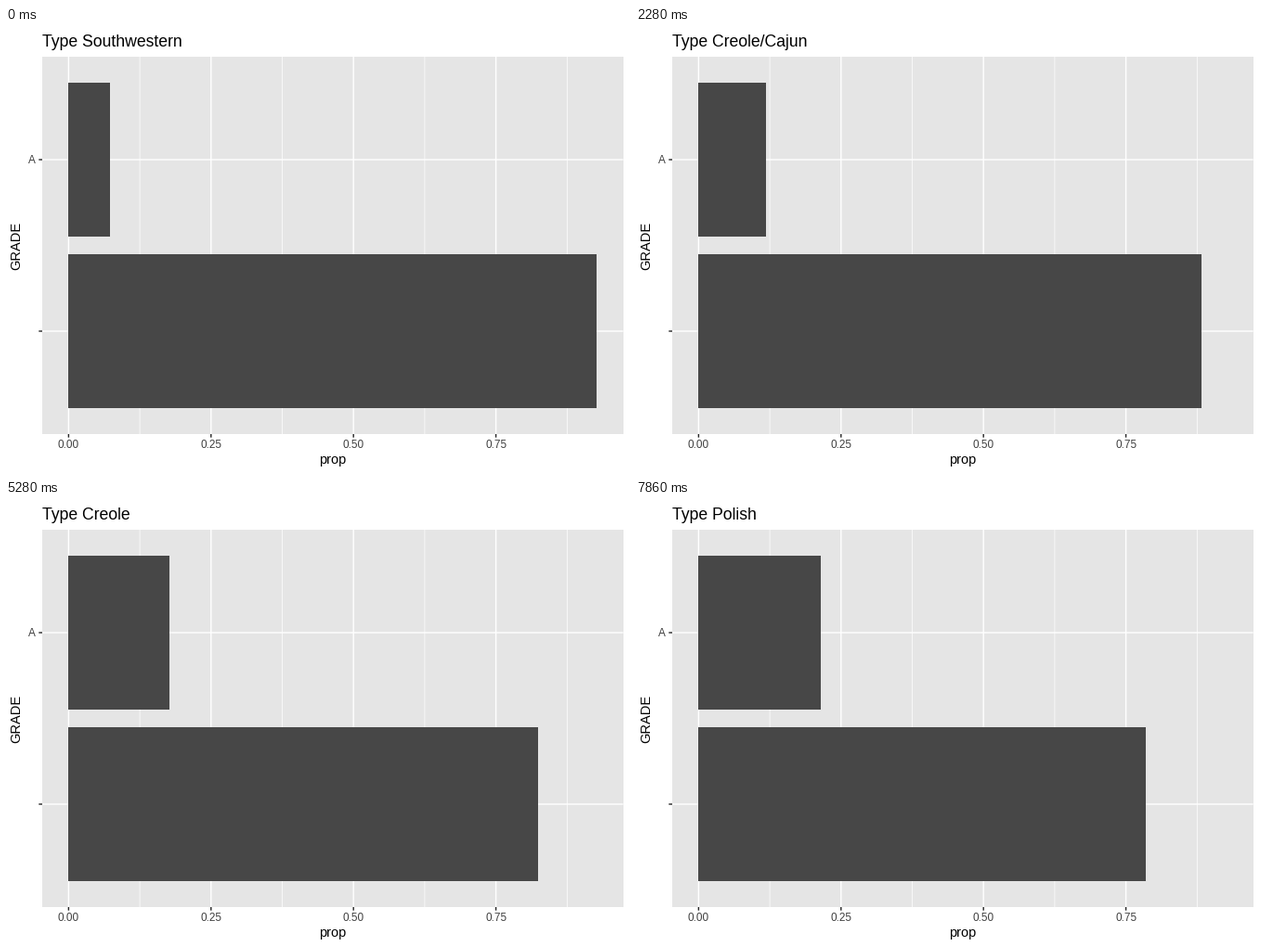
Animation, 672 px wide and 480 px high, one loop 8 s. Source, as a matplotlib script:

```python
import math

import matplotlib.pyplot as plt
from matplotlib.animation import FuncAnimation
from matplotlib.patches import Rectangle

W, H, DPI = 672, 480, 96
STEP, FRAMES = 20, 400
TICK = 30                       # the picture updates on a 30 ms grid
PERIOD, MOVE, FIRST = 540, 480, 285

LEFT, TOP, RIGHT, BOTTOM = 39, 31, 664.6, 438
ZERO, UNIT = 67.4, 613.6        # pixel of 0 and pixels per 1.0 on the x axis
ROW_A, ROW_B, BAR_H = 142, 327, 166
PANEL, BAR, INK, LABEL, MARK = "#e5e5e5", "#474747", "black", "#3e3e3e", "#262626"

# title and share of the lower bar, in order
STATES = [
    ("Southwestern", 38 / 41),
    ("Californian", 0.8998),
    ("Pakistani", 35 / 39),
    ("Filipino", 8 / 9),
    ("Creole/Cajun", 15 / 17),
    ("Chinese/Japanese", 17 / 20),
    ("Chilean", 16 / 19),
    ("African", 16 / 19),
    ("Soul Food", 0.8329),
    ("Korean", 24 / 29),
    ("Creole", 14 / 17),
    ("Spanish", 22 / 27),
    ("Vietnamese/Cambodian/Malaysia", 15 / 19),
    ("Caribbean", 0.787),
    ("Pancakes/Waffles", 0.7857),
    ("Polish", 0.785),
]

plt.rcParams["font.family"] = "Liberation Sans"
fig = plt.figure(figsize=(W / DPI, H / DPI), dpi=DPI, facecolor="white")
ax = fig.add_axes([0, 0, 1, 1])
ax.set_xlim(0, W)
ax.set_ylim(H, 0)
ax.axis("off")


def x_pos(value):
    return ZERO + UNIT * value


def line(x0, y0, x1, y1, color, width):
    ax.plot([x0, x1], [y0, y1], color=color, lw=width * 72 / DPI,
            solid_capstyle="butt", snap=False, zorder=2)


def label(x, y, text, size, color=INK, ha="center", **kw):
    kw.setdefault("va", "baseline")
    return ax.text(x, y, text, fontsize=size, color=color, ha=ha, **kw)


def bar(row):
    patch = Rectangle((67, row - BAR_H / 2), 1, BAR_H, fc=BAR, lw=0, zorder=3)
    return ax.add_patch(patch)


def ease(p):
    """Cubic in and out."""
    return 4 * p ** 3 if p < 0.5 else 1 - 4 * (1 - p) ** 3


def state_at(t):
    """Title and lower share at time t in ms."""
    k = min(max(math.floor((t - FIRST) / PERIOD + 0.5), 0), len(STATES) - 2)
    p = (t - FIRST - k * PERIOD) / MOVE + 0.5
    p = min(max(p, 0), 1)
    (name0, v0), (name1, v1) = STATES[k], STATES[k + 1]
    return (name0 if p < 0.5 else name1), v0 + (v1 - v0) * ease(p)


# panel, grid and axes
ax.add_patch(Rectangle((LEFT, TOP), RIGHT - LEFT, BOTTOM - TOP,
                       fc=PANEL, lw=0, zorder=1))
for i in range(4):
    minor, major = x_pos(0.125 + i / 4), x_pos(i / 4)
    line(minor, TOP, minor, BOTTOM, "white", 0.71)
    line(major, TOP, major, BOTTOM, "white", 1.42)
    line(major, BOTTOM, major, BOTTOM + 3.67, MARK, 1.42)
    label(major, 453, f"{i / 4:.2f}", 8.8, LABEL)
for row in (ROW_A, ROW_B):
    line(LEFT, row, RIGHT, row, "white", 1.42)
    line(LEFT - 3.67, row, LEFT, row, MARK, 1.42)
label(32.3, 146.5, "A", 8.8, LABEL, ha="right")
label((LEFT + RIGHT) / 2, 470, "prop", 11)
label(18, (TOP + BOTTOM) / 2, "GRADE", 11, ha="right", va="center", rotation=90)

title = label(LEFT, 20, "", 13.2, ha="left")
bar_a, bar_b = bar(ROW_A), bar(ROW_B)


def draw(i):
    t = (i * STEP + STEP // 2) // TICK * TICK
    name, share = state_at(t)
    title.set_text("Type " + name)
    for patch, value in ((bar_a, 1 - share), (bar_b, share)):
        patch.set_width(round(x_pos(value)) - 67)
    return title, bar_a, bar_b


anim = FuncAnimation(fig, draw, frames=FRAMES, interval=STEP,
                     repeat=True, repeat_delay=0, blit=True)
plt.show()
```
